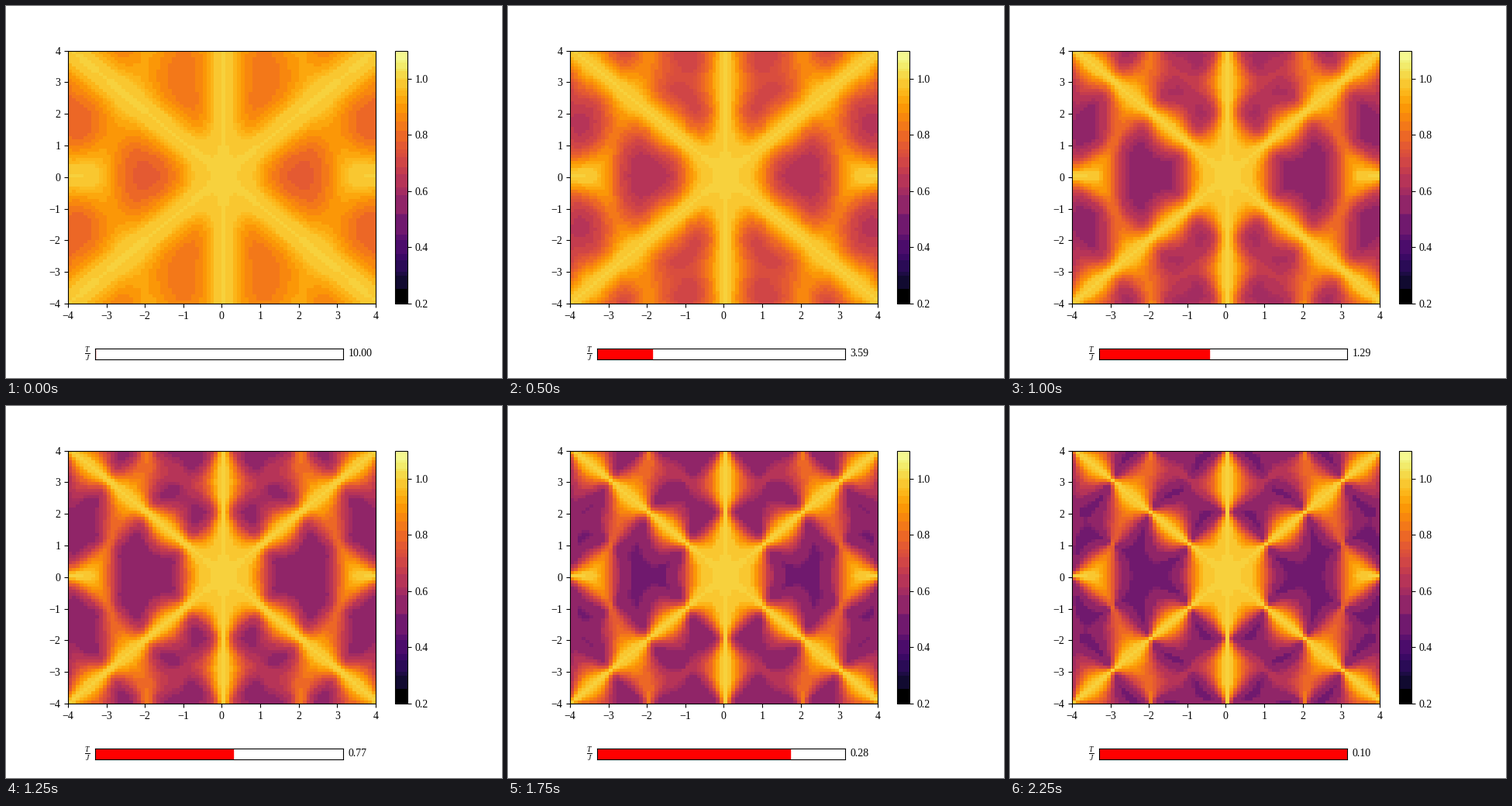
A matplotlib script for the animation above (2500 ms loop, 640x480 px).

```python
import matplotlib.pyplot as plt
import numpy as np
from matplotlib.animation import FuncAnimation
from matplotlib.colors import ListedColormap

plt.rcParams.update({
    "font.family": "Liberation Serif",
    "font.size": 10,
    "mathtext.fontset": "custom",
    "mathtext.rm": "Liberation Serif",
    "mathtext.it": "Liberation Serif:italic",
})

STEPS = 10
TEMPERATURES = np.logspace(1, -1, STEPS)
CELLS = 80

# Local Ising axes of the four pyrochlore sublattices; sites sit at AXES / 8.
AXES = np.array([[1, 1, 1], [1, -1, -1], [-1, 1, -1], [-1, -1, 1]])


def banded_inferno():
    """Inferno reduced to the mean colour of coarse RGB buckets."""
    lut = np.round(plt.get_cmap("inferno")(np.arange(256))[:, :3] * 255).astype(int)
    keys = (lut[:, 0] >> 5) * 256 + (lut[:, 1] >> 4) * 8 + (lut[:, 2] >> 5)
    bands = np.array([lut[keys == key].mean(axis=0) for key in keys])
    bands[keys == 0] = 0
    return ListedColormap(bands / 255)


def dispersive_bands(n=24):
    c = np.cos(2 * np.pi * (np.arange(n) + 0.5) / n)
    a, b, d = np.meshgrid(c, c, c)
    root = 2 * np.sqrt(np.maximum(1 + a * b + b * d + d * a, 0))
    return np.concatenate([(2 + root).ravel(), (2 - root).ravel()])


BANDS = dispersive_bands()


def gap(beta):
    """Lagrange multiplier above the flat band, from unit spin length."""
    low, high = 1e-6, 4.0
    for _ in range(50):
        mid = (low + high) / 2
        length = 0.5 / mid + 0.5 * np.mean(1 / (mid + beta * (BANDS + 2)))
        low, high = (mid, high) if length > 1 else (low, mid)
    return mid


edges = np.linspace(-4, 4, CELLS + 1)
h, l = np.meshgrid(np.round(edges[:-1], 9), np.round(edges[:-1], 9))
q = np.stack([h, h, l], axis=-1)
site_phase = 2 * np.pi * q @ AXES.T / 8
coupling = 2 * np.cos(site_phase[..., :, None] - site_phase[..., None, :]) - 2 * np.eye(4)

# In-plane direction perpendicular to q; any choice works at q = 0.
transverse = np.stack([l, l, -2 * h], axis=-1)
transverse[(h == 0) & (l == 0)] = [0, 0, 1]
transverse /= np.linalg.norm(transverse, axis=-1, keepdims=True)
moment = transverse @ AXES.T / np.sqrt(3)


def structure_factor(temperature):
    beta = 1 / temperature
    delta = gap(beta)
    green = np.linalg.inv((delta + 2 * beta) * np.eye(4) + beta * coupling)
    spin_flip = np.einsum("yxa,yxab,yxb->yx", moment, green, moment)
    return (1 + 0.75 * delta * spin_flip) / 2


maps = [structure_factor(t) for t in TEMPERATURES]

fig, ax = plt.subplots(figsize=(6.4, 4.8), dpi=100)
fig.subplots_adjust(left=0.125, right=0.9, bottom=0.2, top=0.88)
mesh = ax.pcolormesh(edges, edges, maps[0], cmap=banded_inferno(), vmin=0.2, vmax=1.1)
ax.set_xticks(range(-4, 5))
ax.set_yticks(range(-4, 5))
fig.colorbar(mesh, ax=ax, ticks=[0.2, 0.4, 0.6, 0.8, 1.0])

slider = fig.add_axes([0.18, 0.05, 0.5, 0.03])
slider.set(xlim=(0, STEPS - 1), ylim=(0, 1), xticks=[], yticks=[])
bar = slider.axvspan(0, 0, color="red", lw=1)
slider.text(-0.02, 0.5, r"$\frac{T}{J}$", transform=slider.transAxes,
            ha="right", va="center")
readout = slider.text(1.02, 0.5, "", transform=slider.transAxes,
                      ha="left", va="center")


def update(step):
    mesh.set_array(maps[step])
    bar.set_width(step)
    readout.set_text(f"{TEMPERATURES[step]:.2f}")
    return mesh, bar, readout


anim = FuncAnimation(fig, update, frames=STEPS, interval=250, repeat=True, repeat_delay=0)
plt.show()
```
